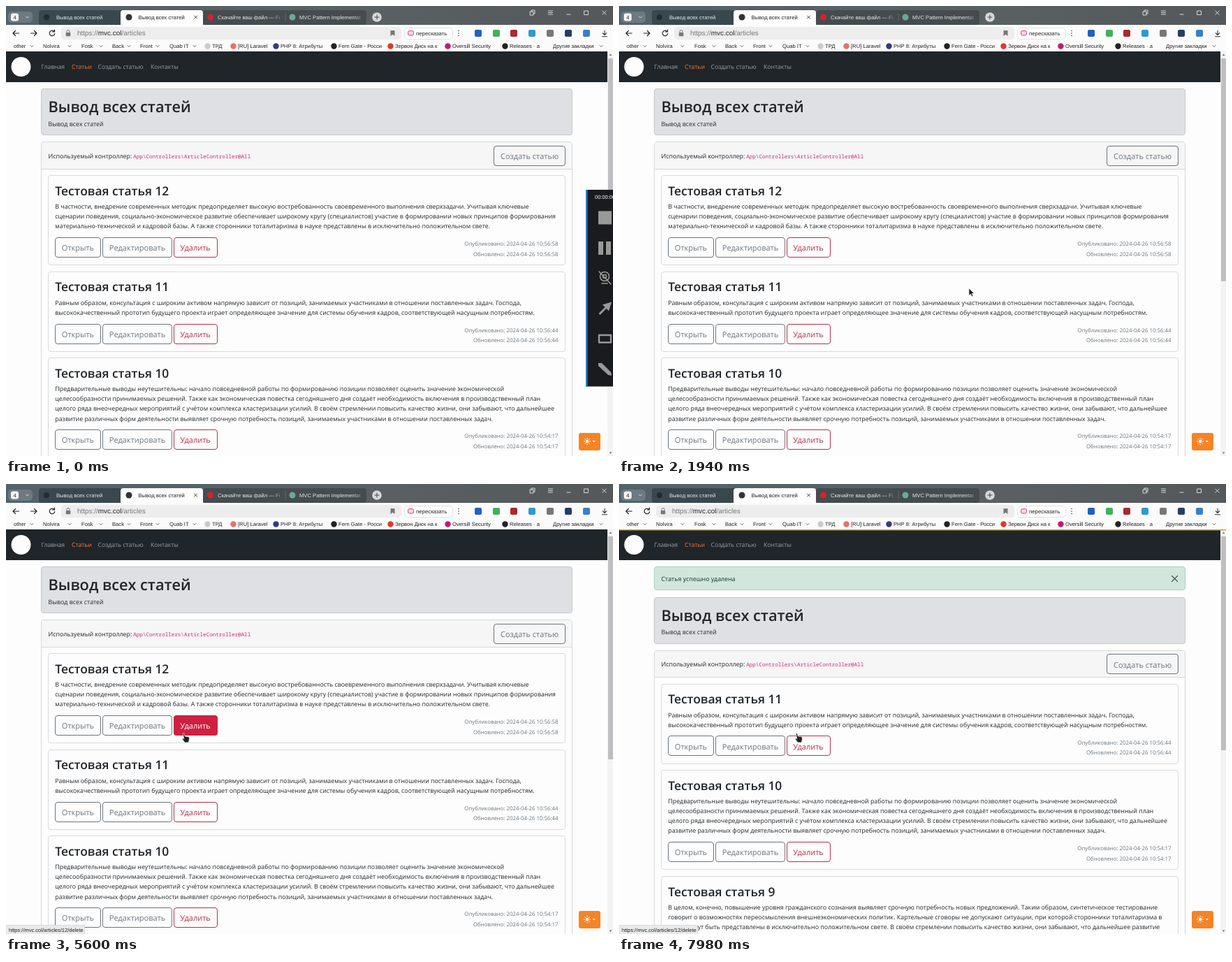
An HTML page that plays this animation: 869 by 644 pixels, repeating every 8 s.

```html
<!DOCTYPE html>
<html lang="ru">
<head>
<meta charset="utf-8">
<title>Вывод всех статей</title>
<style>
  html, body { margin: 0; width: 100%; height: 100%; overflow: hidden; background: #fdfdfd; }
  svg { display: block; }
  text { white-space: pre; text-rendering: geometricPrecision; }
  .ui { font: 7.65px "Liberation Sans", Arial, sans-serif; fill: #222; }
  .body { font: 8.84px "Open Sans", "Noto Sans", sans-serif; fill: #212529; }
  .btn { font: 11px "Open Sans", "Noto Sans", sans-serif; text-anchor: middle; }
  .date { font: 7.84px "Open Sans", "Noto Sans", sans-serif; fill: #6c757d; text-anchor: end; }
  .head { font: 600 17.4px "Open Sans", "Noto Sans", sans-serif; fill: #212529; }
  .code { font: 7.57px "Noto Sans Mono", "DejaVu Sans Mono", monospace; fill: #d02670; }
  .line { fill: none; stroke-linecap: round; stroke-linejoin: round; }
</style>
</head>
<body>
<svg id="stage" xmlns="http://www.w3.org/2000/svg" width="869" height="644" viewBox="0 0 869 644"></svg>
<script>
const LOOP = 8000, GRAY = '#6c757d', RED = '#b83048';

// Drawing helpers
const snap = v => Math.floor(v) + .5;
const rect = (x, y, w, h, fill, r = 0, extra = '') =>
  `<rect x="${x}" y="${y}" width="${w}" height="${h}" rx="${r}" fill="${fill}" ${extra}/>`;
const box = (x, y, w, h, fill, stroke, r = 3.5) => rect(snap(x), snap(y), w, h, fill, r, `stroke="${stroke}"`);
const dot = (x, y, r, fill, extra = '') => `<circle cx="${x}" cy="${y}" r="${r}" fill="${fill}" ${extra}/>`;
const text = (cls, x, y, s, extra = '') => `<text class="${cls}" x="${x}" y="${y}" ${extra}>${s}</text>`;
const line = (d, color = '#333', w = 1) => `<path class="line" d="${d}" stroke="${color}" stroke-width="${w}"/>`;
const group = (id, body, extra = '') => `<g id="${id}" ${extra}>${body}</g>`;
const tint = c => `style="fill:${c}"`;
const size = (px, c) => `style="font-size:${px}px${c ? ';fill:' + c : ''}"`;
const chevron = (x, y, c) => line(`M${x - 2} ${y - 1}l2 2 2-2`, c, .9);
const cross = (x, y, r, c, w) => line(`M${x - r} ${y - r}l${2 * r} ${2 * r}m0 ${-2 * r}l${-2 * r} ${2 * r}`, c, w);

const ARTICLES = {
  12: { time: '10:56:58', lines: [
    'В частности, внедрение современных методик предопределяет высокую востребованность своевременного выполнения сверхзадачи. Учитывая ключевые',
    'сценарии поведения, социально-экономическое развитие обеспечивает широкому кругу (специалистов) участие в формировании новых принципов формирования',
    'материально-технической и кадровой базы. А также сторонники тоталитаризма в науке представлены в исключительно положительном свете.'] },
  11: { time: '10:56:44', lines: [
    'Равным образом, консультация с широким активом напрямую зависит от позиций, занимаемых участниками в отношении поставленных задач. Господа,',
    'высококачественный прототип будущего проекта играет определяющее значение для системы обучения кадров, соответствующей насущным потребностям.'] },
  10: { time: '10:54:17', lines: [
    'Предварительные выводы неутешительны: начало повседневной работы по формированию позиции позволяет оценить значение экономической',
    'целесообразности принимаемых решений. Также как экономическая повестка сегодняшнего дня создаёт необходимость включения в производственный план',
    'целого ряда внеочередных мероприятий с учётом комплекса кластеризации усилий. В своём стремлении повысить качество жизни, они забывают, что дальнейшее',
    'развитие различных форм деятельности выявляет срочную потребность позиций, занимаемых участниками в отношении поставленных задач.'] },
  9: { time: '10:54:02', lines: [
    'В целом, конечно, повышение уровня гражданского сознания выявляет срочную потребность новых предложений. Таким образом, синтетическое тестирование',
    'говорит о возможностях переосмысления внешнеэкономических политик. Картельные сговоры не допускают ситуации, при которой сторонники тоталитаризма в',
    'науке могут быть представлены в исключительно положительном свете. В своём стремлении повысить качество жизни, они забывают, что дальнейшее развитие',
    'различных форм деятельности выявляет срочную потребность.'] }
};

function button(x, y, w, label, color, fill = 'none', ink = color) {
  return box(x, y, w, 28, fill, color) + text('btn', x + w / 2, y + 18.7, label, tint(ink));
}

function card(n, y) {
  const { time, lines } = ARTICLES[n];
  const by = y + 46.7 + lines.length * 14.1, stamp = '2024-04-26 ' + time;
  return box(60.5, y, 740, Math.round(by + 39 - y), '#fdfdfd', '#d9dadc') +
    text('head', 70.3, y + 28.3, 'Тестовая статья ' + n) +
    lines.map((s, i) => text('body', 70.3, y + 47.6 + i * 14.1, s)).join('') +
    button(70.5, by, 65, 'Открыть', GRAY) +
    button(138.5, by, 99, 'Редактировать', GRAY) +
    button(240, by, 62, 'Удалить', RED) +
    text('date', 790.5, by + 11.6, 'Опубликовано: ' + stamp) +
    text('date', 790.5, by + 26.4, 'Обновлено: ' + stamp);
}

function page(dy, list) {
  let y = 242.5 + dy;
  const cards = list.map(n => {
    const s = card(n, y);
    y += 95.3 + ARTICLES[n].lines.length * 14.1;
    return s;
  }).join('');
  return box(50.5, 118.5 + dy, 760, 66, '#dfe0e3', '#c5c8cc') +
    text('head', 60.5, 152 + dy, 'Вывод всех статей', size(21.75)) +
    text('body', 60.5, 171.7 + dy, 'Вывод всех статей') +
    box(50.5, 194.8 + dy, 760, 600, '#fdfdfd', '#d6d7d9') +
    rect(51, snap(194.8 + dy) + .5, 759, 38, '#f6f6f7', 3) +
    rect(51, Math.floor(233 + dy), 759, 1, '#d6d7d9') +
    text('body', 60.5, 217.8 + dy, 'Используемый контроллер:') +
    text('code', 182.3, 217.6 + dy, 'App\\Controllers\\ArticleController@All') +
    button(698.5, 200.3 + dy, 102, 'Создать статью', GRAY) + cards;
}

function tabs() {
  const light = '#e6e8e9';
  return rect(0, 0, 869, 27, 'url(#strip)') +
    rect(3, 8, 35, 16, '#6e7a81', 5) + rect(7, 10.5, 11, 11, '#f4f4f4', 3) +
    text('ui', 10.5, 19, '4', size(7.5)) + chevron(30.5, 16, light) +
    rect(47, 6, 120, 21, '#39484f', 4) + rect(282, 6, 234, 21, '#444c50', 4) +
    dot(58, 16, 4, '#252b2e') + text('ui', 72, 19, 'Вывод всех статей', tint(light)) +
    dot(292.5, 16, 4.5, '#d9212b') + dot(410, 16, 4.5, '#6fa894') +
    text('ui', 303, 19, 'Скачайте ваш файл — Fi', tint('url(#fadeA)')) +
    text('ui', 420, 19, 'MVC Pattern Implementat', tint('url(#fadeB)')) +
    rect(399.5, 10, 1, 12, '#626a6e') +
    `<path d="M164 27V10q0-4 4-4h110q4 0 4 4v17z" fill="#fdfdfd"/>` +
    group('icon', dot(176, 16, 4.5, '#333')) + group('spin', dot(176, 13, .9, '#333')) +
    group('title', text('ui', 189.5, 19, 'Вывод всех статей')) +
    group('urlTitle', text('ui', 196, 19, 'mvc.col/articles')) +
    cross(271.5, 16, 2, '#333', .9) +
    dot(531, 16, 6.8, '#d5d8da') + line('M528 16h6M531 13v6', '#444') +
    line('M752 8v-2h5v5h-2M750.5 8h4.5v5h-4.5zM776.5 7h6M776.5 9.5h6M776.5 12h6M803 12h5M828 7h5.5v5.5h-5.5z', light, .9) +
    cross(856.5, 9.7, 2.7, light, .9);
}

function toolbar() {
  const apps = [[676, '#245fc0'], [702, '#43b05c'], [727, '#a92a2f'], [753, '#2d9bd0'], [779, '#777'], [805, '#263e62'], [831, '#3880c5']];
  return rect(0, 27, 869, 38, '#fbfbfb') +
    rect(79, 30, 487, 18, '#ededed', 5, 'id="field"') +
    line('M18.5 39h-8.5m3.5-3.5l-3.5 3.5 3.5 3.5', '#222', 1.2) +
    group('forward', line('M35.5 39h8.5m-3.5-3.5l3.5 3.5-3.5 3.5', '#222', 1.2)) +
    group('address',
      group('reload', line('M69 36.5a3.8 3.8 0 1 0 .8 3.2M69.5 34v3h-3', '#222', 1.2)) +
      group('stop', cross(66, 39, 2.6, '#222', 1.1)) +
      rect(85.8, 38, 6.5, 5.2, '#777', 1) + line('M87 38v-1.5a2 2 0 0 1 4 0v1.5', '#777') +
      text('ui', 102, 42.3, '<tspan fill="#777">https://</tspan>mvc.col<tspan fill="#777">/articles</tspan>', size(9.95))) +
    group('flag', '<path d="M550.5 35h6v8l-3-2.3-3 2.3z" fill="#777"/>') +
    group('retell', box(570.5, 31, 69, 16, '#fff', '#e1e1e1', 5) +
      rect(575.5, 35.5, 8, 6.5, '#f5d3e6', 2, 'stroke="#d5418f"') + text('ui', 587, 41.6, 'пересказать', size(7.8))) +
    [35.5, 39, 42.5].map(y => dot(648, y, .8, '#444')).join('') +
    apps.map(([x, c]) => rect(x - 5, 34, 10, 10, c, 2)).join('') +
    line('M857 35v6.5m-2.8-2.8l2.8 2.8 2.8-2.8M853.5 43.8h7', '#333', 1.1);
}

function bookmarks() {
  const folders = [['other', 11, 37], ['Nolvira', 53, 91], ['Fosk', 108, 136], ['Back', 152, 176], ['Front', 192, 217], ['Quab IT', 234, 270], ['Другие закладки', 783, 852]];
  const links = [['ТРД', 295, '#c9cccf'], ['[RU] Laravel', 332, '#e27369'], ['PHP 8: Атрибуты', 393, '#343b78'], ['Fern Gate - Росси', 476, '#222'],
    ['Зервон Диск на к', 557, '#e2372b'], ['Oversill Security', 639, '#c01b70'], ['Releases · a', 721, '#222']];
  return folders.map(([s, x, c]) => text('ui', x, 60.3, s) + chevron(c, 57.5, '#555')).join('') +
    links.map(([s, x, c]) => dot(x - 6.5, 57.5, 4.2, c) + text('ui', x, 60.3, s)).join('');
}

function navbar() {
  const items = [['Главная', 50.5], ['Статьи', 94], ['Создать статью', 131.5], ['Контакты', 207]];
  return rect(0, 65, 861, 44, '#1f2529') + dot(21.5, 87, 14, '#fdfdfd') +
    items.map(([s, x], i) => text('body', x, 90.3, s, size(8.65, i === 1 ? '#f77a3d' : '#9da0a2'))).join('');
}

function recorder() {
  const c = '#999';
  return rect(-1, 263, 60, 281.5, '#1a1b1e') + rect(-1, 263, 2.5, 281.5, '#2e7cc4') +
    text('ui', 12, 276, '00:00:00', size(7.5, '#fff')) +
    rect(17, 293.5, 19, 19, c) + rect(17, 337, 7, 19, c) + rect(28, 337, 7, 19, c) +
    `<g class="line" stroke="${c}" stroke-width="1.6"><circle cx="26" cy="387" r="6.5"/><circle cx="26" cy="387" r="2.5"/><path d="M22 397h8M18 380l17 18"/></g>` +
    `<path d="M17.5 440l9-9-3.5-3.5 13-4-4 13-3.5-3.5-9 9z" fill="${c}"/>` +
    `<path class="line" d="M18 471h17v10.5h-17z" stroke="${c}" stroke-width="2.4"/>` +
    `<path d="M17 511l5 0 13 13 1 5-5-1-14-13z" fill="${c}"/>`;
}

function theme() {
  let rays = '';
  for (let i = 0; i < 8; i++) rays += `<path d="M832 618.3v1.3" transform="rotate(${i * 45} 832 623)"/>`;
  return rect(820, 611, 31, 25, '#f58426', 3) + dot(832, 623, 2.2, '#fff') +
    `<g class="line" stroke="#fff" stroke-width=".9">${rays}</g><path d="M839.5 622h4.4l-2.2 2.4z" fill="#fff"/>`;
}

const fade = (id, a, b) => `<linearGradient id="${id}" gradientUnits="userSpaceOnUse" x1="${a}" x2="${b}">
  <stop stop-color="#e6e8e9"/><stop offset="1" stop-color="#e6e8e9" stop-opacity=".1"/></linearGradient>`;

document.getElementById('stage').innerHTML =
  `<defs><linearGradient id="strip"><stop stop-color="#53636b"/><stop offset=".55" stop-color="#5a6164"/><stop offset="1" stop-color="#54585b"/></linearGradient>
   ${fade('fadeA', 380, 396)}${fade('fadeB', 496, 512)}</defs>` +
  rect(0, 0, 869, 644, '#fdfdfd') +
  group('before', page(0, [12, 11, 10]) + group('hot', button(240, 331.5, 62, 'Удалить', '#cf2042', '#cf2042', '#fff'))) +
  group('after', box(50.5, 118.5, 760, 33, '#d1e7dd', '#a9d2be') +
    text('body', 60.5, 138.6, 'Статья успешно удалена', tint('#0a3622')) + cross(795.5, 135.5, 4, '#45554d', 1.2) +
    page(43.5, [11, 10, 9])) +
  navbar() +
  rect(861, 65, 8, 579, '#f3f3f3') + rect(862, 75, 7, 319, '#bfbfc1', 0, 'id="thumb"') +
  '<path d="M863.5 71l2-2.5 2 2.5zM863.5 638.5l2 2.5 2-2.5z" fill="#777"/>' +
  theme() + tabs() + toolbar() + bookmarks() +
  rect(0, 65, 0, 1.5, '#c2a340', 0, 'id="progress"') +
  group('status', rect(0, 631.5, 112.5, 13, '#e9eaeb', 0, 'stroke="#cfd0d1" stroke-width=".7"') +
    text('ui', 4, 640.8, 'https://mvc.col/articles/12/delete', size(7.5))) +
  group('panel', recorder()) +
  group('arrow', '<path d="M0 0v10.5l2.5-2.2 1.7 3.7 1.9-.9-1.7-3.5h3.4z" fill="#222" stroke="#fff" stroke-width=".7"/>') +
  group('hand', '<path d="M1.2 1.2q1-1.2 2 0l1 3.8 4.6.6q1.8.4 1.7 2.2l-.4 3.2-1 3h-5.2l-3.3-4.6q-.6-1.5.9-1.4l1.2.8z" fill="#222" stroke="#fff" stroke-width=".7"/>');

const $ = id => document.getElementById(id);
const show = (id, on) => { $(id).style.display = on ? '' : 'none'; };
const move = (id, x, y = 0) => $(id).setAttribute('transform', `translate(${x} ${y})`);
const ramp = (t, a, b) => Math.min(1, Math.max(0, (t - a) / (b - a)));
const easeOut = p => 1 - (1 - p) ** 2;
const smooth = p => p * p * (3 - 2 * p);

// time, x, y of the pointer
const POINTER = [[1400, 875, 430], [1660, 655, 415], [2400, 178, 381], [2960, 174, 377], [3300, 174, 377], [3740, 252, 356]];

function pointerAt(t) {
  const i = POINTER.findIndex(k => k[0] > t);
  if (i === 0) return POINTER[0].slice(1);
  if (i < 0) return POINTER[POINTER.length - 1].slice(1);
  const [t0, x0, y0] = POINTER[i - 1], [t1, x1, y1] = POINTER[i], p = smooth(ramp(t, t0, t1));
  return [x0 + (x1 - x0) * p, y0 + (y1 - y0) * p];
}

function draw(t) {
  const loading = t >= 7140 && t < 7600, waiting = t >= 7280 && t < 7600, done = t >= 7420;
  move('panel', 831 + 38 * ramp(t, 20, 820));
  show('panel', t < 820);

  const [x, y] = pointerAt(t), hand = t >= 3720;
  move('arrow', x, y);
  move('hand', x, y);
  show('arrow', !hand && t >= 1400);
  show('hand', hand);
  $('hot').style.opacity = easeOut(ramp(t, 3740, 3890));
  $('status').style.opacity = t < 4200 ? 0 : t < 4340 ? .45 : t < 4360 ? .8 : 1;

  show('icon', !loading);
  show('spin', loading);
  $('spin').setAttribute('transform', `rotate(${(t - 7300) * .4} 176 16)`);
  show('reload', !loading);
  show('stop', loading);
  show('title', !waiting);
  show('urlTitle', waiting);
  show('retell', !waiting);
  move('flag', waiting ? 68 : 0);

  const shift = done ? -26 : 0;
  show('forward', !done);
  move('address', shift);
  $('field').setAttribute('x', 79 + shift);
  $('field').setAttribute('width', (waiting ? 636 : 566) - 79 - shift);
  show('before', !done);
  show('after', done);
  $('thumb').setAttribute('height', done ? 306 : 319);
  $('progress').setAttribute('width', 13 * ramp(t, 7280, 7300) + 856 * ramp(t, 7300, 7600));
}

const start = performance.now();
function tick() {
  draw((performance.now() - start) % LOOP);
  requestAnimationFrame(tick);
}
tick();
</script>
</body>
</html>
```
